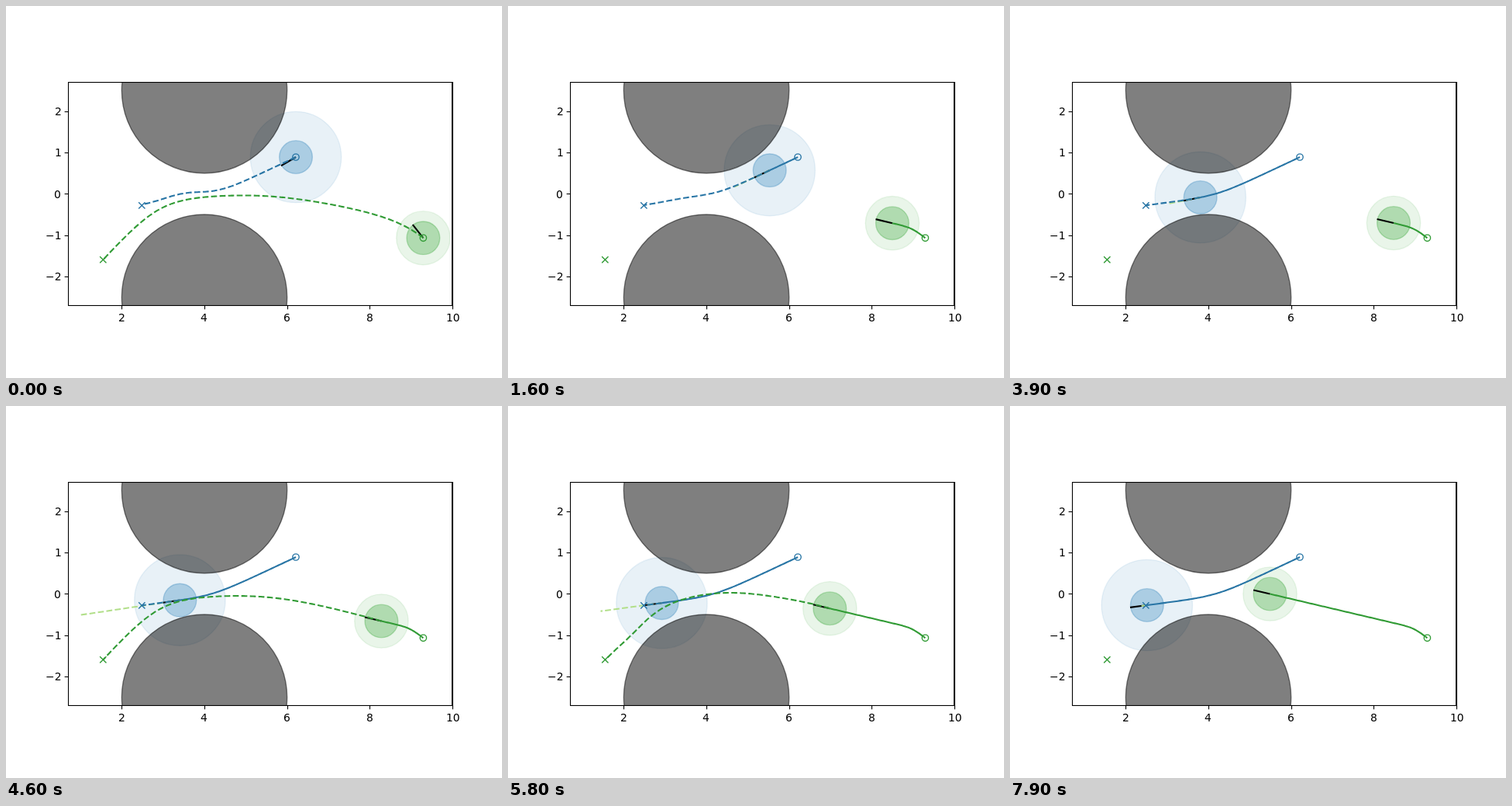
Animation, 640 px wide and 480 px high, one loop 8 s. Source, as an HTML page with a canvas:

```html
<!DOCTYPE html>
<html>
<head>
<meta charset="utf-8">
<style>
html, body { margin: 0; width: 100%; height: 100%; overflow: hidden; background: #fff; }
canvas { display: block; }
</style>
</head>
<body>
<canvas id="stage" width="640" height="480"></canvas>
<script>
const ctx = document.getElementById('stage').getContext('2d');
const UNIT = 160 / 3, LOOP = 8000, STEP = 100;
const px = x => 128 / 3 + UNIT * x;
const py = y => 242.4 - UNIT * y;

const clamp = v => Math.min(1, Math.max(0, v));
const smooth = v => { v = clamp(v); return v * v * (3 - 2 * v); };
const sigmoid = (x, mid, width) => 1 / (1 + Math.exp((mid - x) / width));
const bell = (x, mid, width) => Math.exp(-(((x - mid) / width) ** 2));
// Smooth bend: flat before mid, slope 1 after it
const bend = (x, mid, width) => width * Math.log(1 + Math.exp((x - mid) / width));

// Each agent runs along y(x); x(t) sets its pace, turn is its initial heading error
const blue = {
  color: '#1f77b4', ink: '#2875a5', safety: 1.1, goal: [175.3, 257.4], turn: -.09,
  x: t => 168 + 206 * Math.exp(-t * t / (11.5 + 1.05 * t)),
  y: x => 257 - .13 * (x - 177) - .34 * bend(x, 267, 15)
};
const green = {
  color: '#2ca02c', ink: '#319b35', safety: .65, goal: [125.3, 327.4], turn: .25,
  x: t => 538.4 - 43.4 * smooth(t / 1.75) - 159.5 * smooth((t - 4.05) / 3.5),
  y: x => 242.5 + .235 * (x - 335.5) + .55 * bend(x, 522, 5)
};
const agents = [blue, green];

const hasPlan = t => t < .95 || (t >= 4 && t < 6.55);

function greenPlan(t) {
  const early = t < 2;
  const k = clamp(early ? t / .8 : (t - 5.2) / 1.2);
  const detour = early
    ? x => 22 * sigmoid(x, 290, 14) - .07 * bend(x, 340, 20) - 6 * bell(x, 222, 35)
    : x => 6 * bell(x, 158, 22) - 8.5 * bell(x, 278, 60);
  const [gx, gy] = green.goal;
  const route = x => gy - .6 - 1.1 * (x - gx) + 1.03 * bend(x, 196, 20)
    + (early ? .27 : .33) * bend(x, 340, 35) + k * detour(x);
  const gap = green.py - route(green.px);
  return x => route(x) + gap * ((x - gx) / (green.px - gx)) ** 12;
}

const bluePlan = t => x => blue.y(x) - Math.max(0, 8 - 3.5 * t) * bell(x, 230, 38);

function line(points, color, width = 2.08, dash = []) {
  ctx.beginPath();
  points.forEach(p => ctx.lineTo(...p));
  ctx.strokeStyle = color;
  ctx.lineWidth = width;
  ctx.setLineDash(dash);
  ctx.stroke();
  ctx.setLineDash([]);
}

const dashed = (points, color) => line(points, color, 2.08, [7.7, 3.33]);

function sample(f, from, to) {
  const n = Math.max(1, Math.ceil(Math.abs(to - from) / 2));
  return Array.from({ length: n + 1 }, (_, i) => {
    const x = from + (to - from) * i / n;
    return [x, f(x)];
  });
}

function disc(x, y, r, color, alpha) {
  ctx.globalAlpha = alpha;
  ctx.fillStyle = ctx.strokeStyle = color;
  ctx.lineWidth = 1.39;
  ctx.beginPath();
  ctx.arc(x, y, r, 0, 7);
  ctx.fill();
  ctx.stroke();
  ctx.globalAlpha = 1;
}

function markers({ ink, goal: [x, y], x: xAt, y: yAt }) {
  const r = 4.17;
  ctx.strokeStyle = ink;
  ctx.lineWidth = 1.39;
  ctx.beginPath();
  ctx.arc(xAt(0), yAt(xAt(0)), r, 0, 7);
  ctx.moveTo(x - r, y - r);
  ctx.lineTo(x + r, y + r);
  ctx.moveTo(x - r, y + r);
  ctx.lineTo(x + r, y - r);
  ctx.stroke();
}

// Straight segment from an agent along its heading
function ahead(agent, t, length) {
  const slope = agent.y(agent.px + .5) - agent.y(agent.px - .5);
  const a = Math.atan(slope) + agent.turn * Math.exp(-5 * t);
  return [[agent.px, agent.py],
    [agent.px - length * Math.cos(a), agent.py - length * Math.sin(a)]];
}

// Places text by its inked width on whole pixels; align 0.5 centres, 1 ends at x
function label(text, x, y, align) {
  const m = ctx.measureText(text);
  const ink = Math.ceil(m.actualBoundingBoxRight) - Math.floor(-m.actualBoundingBoxLeft);
  ctx.fillText(text, Math.floor(x - ink * align), Math.round(y));
}

function axes() {
  const snap = v => Math.round(v) + .5;
  ctx.fillStyle = '#000';
  ctx.fillRect(575, 98, 2, 289);
  ctx.strokeStyle = '#000';
  ctx.lineWidth = 1.1;
  ctx.strokeRect(80.5, 98.5, 496, 288);
  ctx.font = '13.89px "DejaVu Sans", sans-serif';
  for (let x = 2; x <= 10; x += 2) {
    line([[snap(px(x)), 386.5], [snap(px(x)), 391.4]], '#000', 1.1);
    label(String(x), px(x), 407, .5);
  }
  for (let y = -2; y <= 2; y++) {
    line([[75.6, snap(py(y))], [80.5, snap(py(y))]], '#000', 1.1);
    label(String(y).replace('-', '\u2212'), 70.3, py(y) + 5.1, 1);
  }
}

function draw(t) {
  ctx.fillStyle = '#fff';
  ctx.fillRect(0, 0, 640, 480);
  ctx.save();
  ctx.beginPath();
  ctx.rect(80, 98, 496.5, 288.5);
  ctx.clip();

  for (const a of agents) {
    a.px = a.x(t);
    a.py = a.y(a.px);
    disc(a.px, a.py, a.safety * UNIT, a.color, .1);
    disc(a.px, a.py, .4 * UNIT, a.color, .3);
  }
  for (const y of [2.5, -2.5]) disc(px(4), py(y), 2 * UNIT, '#000', .5);

  for (const a of agents) line(ahead(a, t, 22), '#000');

  const speed = (blue.x(t - .1) - blue.x(t + .1)) / .2;
  if (t > 0) dashed(ahead(blue, t, speed * (hasPlan(t) ? 4.8 : 1.3)), '#b2df8a');

  for (const a of agents) line(sample(a.y, a.x(0), a.px), a.ink);
  dashed(sample(bluePlan(t), blue.px, blue.goal[0]), blue.ink);
  if (hasPlan(t)) dashed(sample(greenPlan(t), green.px, green.goal[0]), green.ink);
  agents.forEach(markers);
  ctx.restore();
  axes();
}

const origin = performance.now();
function tick() {
  const ms = Math.max(0, performance.now() - origin) % LOOP;
  draw(Math.floor(ms / STEP) * STEP / 1000);
  requestAnimationFrame(tick);
}
tick();
</script>
</body>
</html>
```
